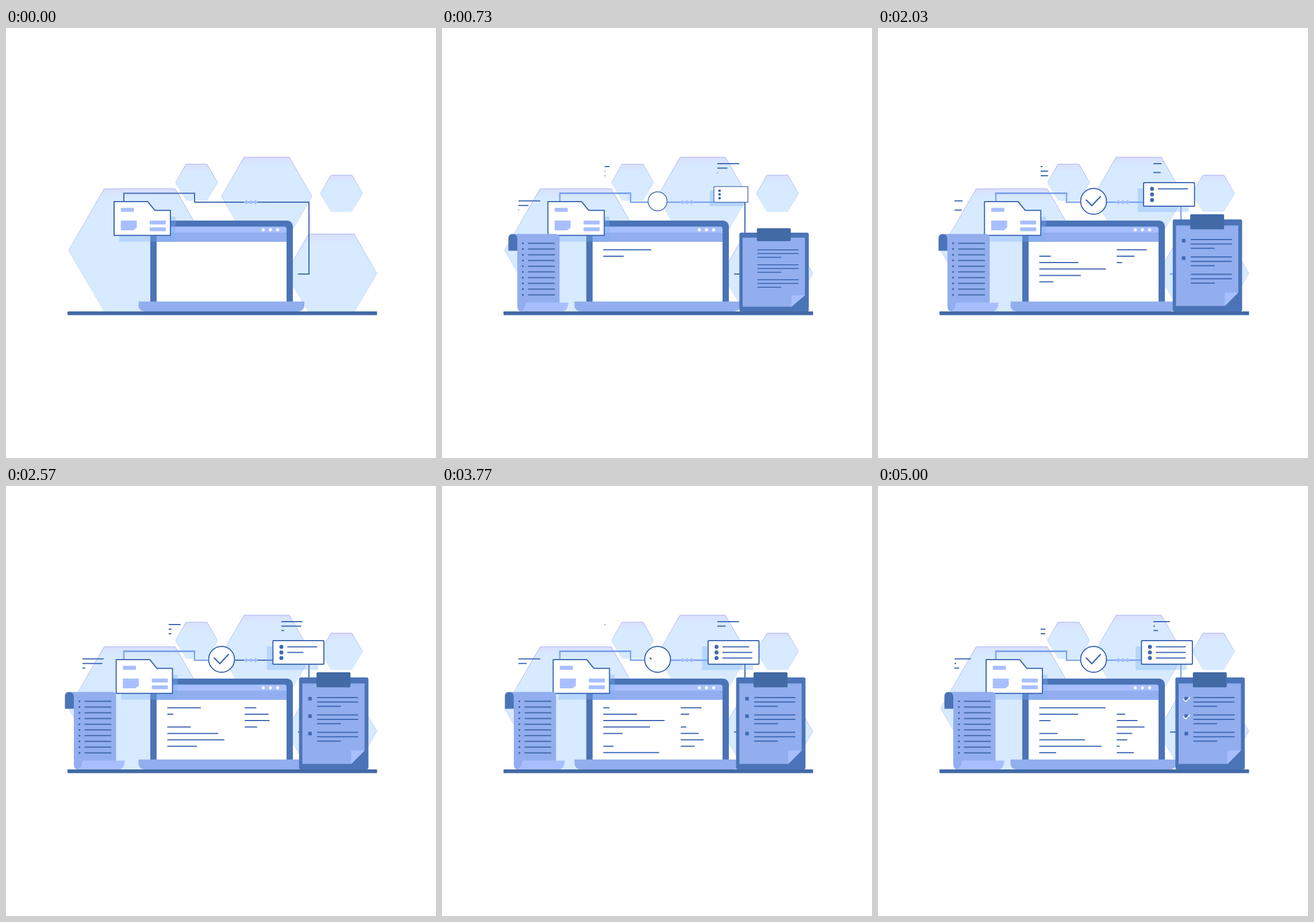
Animation, 748 px wide and 748 px high, one loop 5.03 s. Source, as an HTML page with a canvas:

```html
<!DOCTYPE html>
<html lang="en">
<head>
<meta charset="utf-8">
<title>Documents on a desk</title>
<style>
html, body { margin: 0; width: 100%; height: 100%; overflow: hidden; background: #fff; }
canvas { display: block; }
</style>
</head>
<body>
<canvas id="stage" width="748" height="748"></canvas>
<script>
const c = document.getElementById('stage').getContext('2d');
const LOOP = 5030;
const INK = '#4069b4', DARK = '#4b74b8', DEEP = '#426aa5', MID = '#92aeee', LIGHT = '#a8bfff',
      GLOW = '#7ba3ee', SHADE = 'rgba(124,174,245,.35)';
let t = 0;

// Eased progress of the current time from a to b.
function ease(a, b) {
  const p = Math.min(1, Math.max(0, (t - a) / (b - a)));
  return p * p * (3 - 2 * p);
}
const sway = (a, b, d) => ease(a, b) - ease(b, d);
// Swings 0, 1, 0, 1... reaching each end at the given times.
const swing = times => times.slice(1).reduce(
  (v, end, i) => v + (i % 2 ? -1 : 1) * ease(times[i], end), 0);

function shape(path, fill, stroke, width = 2) {
  const p = new Path2D(path);
  if (fill) { c.fillStyle = fill; c.fill(p); }
  if (stroke) { c.strokeStyle = stroke; c.lineWidth = width; c.stroke(p); }
}
function box(x, y, w, h, fill, r = 0) {
  c.fillStyle = fill;
  c.beginPath();
  c.roundRect(x, y, w, h, r);
  c.fill();
}
function dot(x, y, r, fill, stroke) {
  c.beginPath();
  c.arc(x, y, r, 0, 7);
  c.fillStyle = fill;
  c.fill();
  if (stroke) { c.strokeStyle = stroke; c.lineWidth = 2; c.stroke(); }
}
function rule(x, y, len, color = INK) {
  if (len > 0.3) box(x, y - 1, len, 2, color);
}
// Draws the first part of a path of known length.
function trace(path, len, part, color, width) {
  if (part <= 0) return;
  c.setLineDash([len * part, 999]);
  shape(path, null, color, width);
  c.setLineDash([]);
}
function group(draw, x = 0, y = 0, sx = 1, sy = 1, dx = 0) {
  if (sx <= 0 || sy <= 0) return;
  c.save();
  c.translate(x + dx, y);
  c.scale(sx, sy);
  c.translate(-x, -y);
  draw();
  c.restore();
}

function hexagon(x, y, r) {
  const h = r * 0.866;
  const fill = c.createLinearGradient(0, y - h, 0, y + h);
  fill.addColorStop(0, '#dadffc');
  fill.addColorStop(Math.min(0.12, 5 / r), '#d8e5fe');
  fill.addColorStop(Math.min(0.2, 9 / r), '#d7eaff');
  fill.addColorStop(1, '#d7eaff');
  const edge = c.createLinearGradient(0, y - h, 0, y + h);
  edge.addColorStop(0, '#abacf6');
  edge.addColorStop(0.6, '#c6cffb');
  edge.addColorStop(0.9, '#d7eaff');
  shape(`M${x - r} ${y}L${x - r / 2} ${y - h}h${r}L${x + r} ${y}L${x + r / 2} ${y + h}h${-r}Z`, fill, edge, 1);
}

function wire() {
  const path = 'M205 302V287.5H328V303H527V428H508';
  shape(path, null, INK);
  const u = (t - 205) % 1033;
  if (t > 205 && u < 880) trace(path, 497, Math.min(1, u / 780), GLOW, 2.4);
  for (const x of [418, 426, 434]) shape(`M${x - 4} 303l4-4 4 4-4 4Z`, '#a3bcff');
}

function notes() {
  const first = swing([150, 730, 1700, 2500, 3130, 3800, 4480, 5250]);
  const second = swing([400, 1100, 2000, 2700, 3500, 4150, 4900, 5500]);
  const third = swing([650, 1450, 2400, 3170, 3800, 4650, 5150]);
  const early = swing([500, 1250, 2200, 2900, 3700, 4370, 5000]);
  const put = (x, y, gap, parts) => parts.forEach((p, i) => rule(x, y + gap * i, 38 * p));
  put(133, 300.7, 8, [first, second, third]);
  put(283, 241, 8, [early, third, third]);
  put(479, 236, 7.7, [first, second, third]);
}

function laptop() {
  box(251, 335, 248, 142, DARK, [10, 10, 0, 0]);
  box(262, 345.5, 226, 12, LIGHT, [4, 4, 0, 0]);
  box(262, 356, 226, 16.5, MID);
  box(262, 372, 226, 104, '#fff');
  for (const x of [447.5, 460, 472.5]) dot(x, 351, 2.7, '#fff');
  box(230.5, 475.7, 288.5, 17.3, MID, [1, 1, 10, 10]);

  const column = (x, max, start, period, steps) => steps.forEach((step, row) => {
    for (let k = 0; k < 3; k++) {
      const peak = start + k * period + 345 * step;
      rule(x, 385.8 + 11.15 * row, max * (1 - Math.abs(t - peak) / 850));
    }
  });
  column(280.5, 118, 980, 2020, [0, 1, 2, 3, 4, 5, 6, 7.65]);
  column(415.3, 53, 2040, 2000, [0, 1, 2, 3, 4, 4.4, 6.35, 7.5]);
}

function folder() {
  const outline = 'M188 302H246.5L259 317.3H286V360.7H188Z';
  group(() => shape(outline, SHADE), 0, 0, 1, 1, 0);
  c.save();
  c.translate(9, 11);
  shape(outline, SHADE);
  c.restore();
  c.lineJoin = 'round';
  shape(outline, '#fff', INK);
  c.lineJoin = 'miter';
  box(199.7, 312.7, 22.8, 7, LIGHT, 1);
  shape('M199.7 335H227.5V347L221.5 352H199.7Z', LIGHT);
  box(250, 335, 28, 6.7, LIGHT, 1);
  box(250, 346.8, 28, 6.7, LIGHT, 1);
}

function badge() {
  const size = ease(400, 900) - ease(2750, 3260) + ease(3260, 3700);
  const drawn = t < 3260 ? ease(900, 1430) : ease(3650, 4250);
  group(() => {
    dot(375, 301.5, 22.5, '#fff', INK);
    trace('M361.5 298.5L372 309L387.5 292.5', 37.6, drawn, INK, 2.4);
  }, 375, 301.5, size, size);
}

function card() {
  box(448, 279, 89, 41, SHADE);
  box(457.3, 268, 90.6, 43, INK, 2);
  box(459.3, 270, 86.6, 39, '#fff', 1);
  const parts = [
    ease(1100, 1850) - ease(3700, 4050) + ease(4070, 4800),
    ease(2150, 2950),
    ease(3020, 3800)
  ];
  parts.forEach((p, i) => {
    const y = 279.8 + 9.7 * i;
    dot(473, y, 3.5, INK);
    rule(483.3, y, 52 * p);
  });
}

function clipboard() {
  box(517.3, 333, 120.7, 160, DARK, 3);
  shape('M523 343.5H631.3V460L608 483.5H523Z', MID);
  shape('M608 460.3H631.3L608 483.5Z', LIGHT);
  box(547.7, 324, 59, 26.3, DEEP, 2);
  const marks = [ease(1000, 1540), ease(1000, 1540), ease(1900, 2450)];
  const ticks = [ease(3850, 4400), ease(4200, 4750), 0];
  for (let i = 0; i < 3; i++) {
    const y = 368 + 30.3 * i, s = 6.2 * marks[i];
    rule(548.7, y, 71.5);
    rule(548.7, y + 7.7, 71.5);
    rule(548.7, y + 15.2, 41.5);
    box(536.3 - s / 2, y + 2 - s / 2, s, s, INK);
    trace(`M530.5 ${y + 2.5}l5 4.3 7.5-7.5`, 17.2, ticks[i], '#fff', 1.6);
  }
}

function scroll() {
  shape('M115.5 387.5V366Q115.5 358.3 123 358.3Q131 358.3 131 366V387.5Z', DARK);
  shape('M123 358.3H198Q204.5 358.3 204.5 365V480H146Q145 493 138 493Q131 493 131 484V366Q131 358.3 123 358.3Z', MID);
  shape('M146.5 477.7H220Q218.5 492 210 493H137Q144.500 491 146.500 477.700Z', LIGHT);
  for (let i = 0; i < 10; i++) {
    const y = 374.5 + 9.97 * i;
    dot(140.7, y, 1.7, DEEP);
    rule(149.7, y, 46.5, DEEP);
  }
}

function draw() {
  c.fillStyle = '#fff';
  c.fillRect(0, 0, 748, 748);
  hexagon(232.5, 386.7, 123.5);
  hexagon(453.5, 293, 78.7);
  hexagon(331.5, 268.5, 36.5);
  hexagon(583.5, 287.7, 36.5);
  hexagon(566, 426.8, 79);
  notes();
  wire();
  laptop();
  group(folder, 0, 0, 1, 1, -7 * ease(0, 1400) + 14.5 * ease(1400, 3170) - 7.5 * ease(3170, 4900));
  badge();

  const drift = sway(950, 3000, 5000);
  const pop = ease(430, 920);
  group(card, 502.5, 289.5, pop, pop, 6.8 * drift);
  group(clipboard, 577, 493, 1, ease(350, 850), -8.5 * drift);
  group(scroll, 168, 493, 1, ease(150, 600), -13 * sway(700, 2600, 4850));
  box(107, 493, 538.5, 6.5, DEEP, 1);
}

function frame(now) {
  t = now % LOOP;
  draw();
  requestAnimationFrame(frame);
}
frame(0);
</script>
</body>
</html>
```
